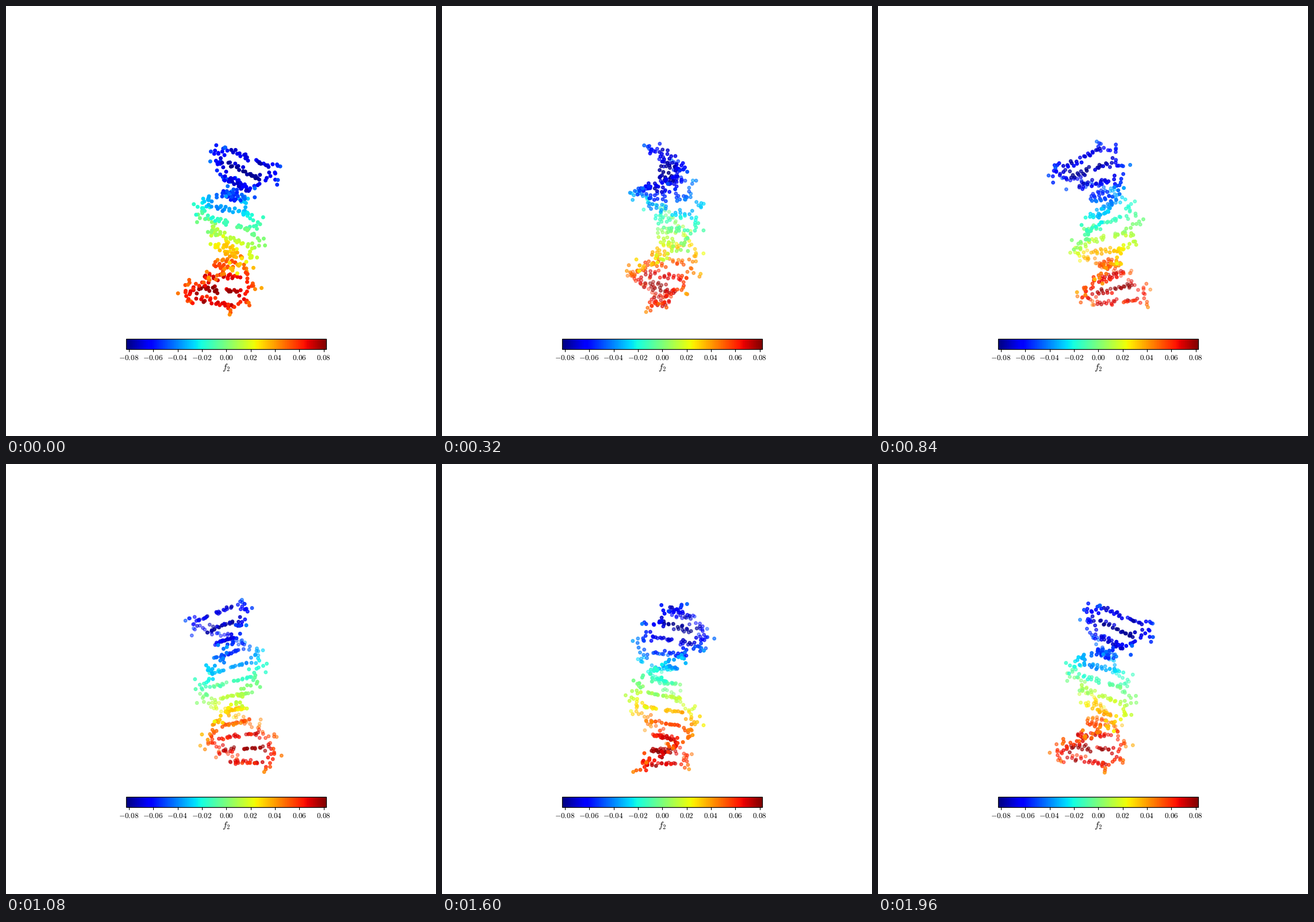
Animation, 748 px wide and 748 px high, one loop 2 s. Source, as a matplotlib script:

```python
import numpy as np
import matplotlib.pyplot as plt
from matplotlib.animation import FuncAnimation
from matplotlib.patches import Rectangle

SIZE, DPI = 748, 100
FRAMES, INTERVAL = 50, 40
ELEV = np.radians(10)
CAMERA = 3200
VMAX = 0.0822

plt.rcParams["mathtext.fontset"] = "cm"

SEQUENCE = "CGCGAATTCGCG"
PAIR = dict(zip("ACGT", "TGCA"))
TURN = 36


def arc(cx, cy, radius, start, step, count):
    """Points on a circle, angles in degrees."""
    t = np.radians(start + step * np.arange(count))
    return np.column_stack([cx + radius * np.cos(t), cy + radius * np.sin(t)])


def base_atoms(base):
    """Flat base: a hexagon, a pentagon for purines, and side atoms."""
    if base in "AG":
        centre, start = (-0.97, 1.93), 41
        side = [-20] + [219] * (base == "G")
        rings = [arc(-0.32, 3.90, 1.14, 0, 72, 3)]
    else:
        centre, start = (-0.21, 3.71), 22
        side = [202, 322] + [22] * (base == "T")
        rings = []
    rings.append(arc(*centre, 1.37, start, 60, 6))
    rings += [arc(*centre, 2.67, angle, 0, 1) for angle in side]
    flat = np.vstack(rings)
    return np.column_stack([flat, 0.08 * flat[:, 0]])


def spine_atoms(first):
    """Backbone chain, sugar ring and, past the first unit, a phosphate."""
    k = np.arange(1 if first else 0, 6)
    chain = [7.7 + 0.16 * (k - 2.8) ** 2, 88 + 7 * k, 0.1 * k ** 2 - 1.9]
    u = np.radians([90, 160, 230])
    sugar = [7.1 + 1.2 * np.cos(u), 113 + 0 * u, 1.1 * np.sin(u) - 0.45]
    parts = [chain, sugar]
    if not first:
        side = np.array([-1, 1])
        parts.append([9.85 + 0.55 * side, 87 + 5 * side, -1.35 - 0.65 * side])
    r, phi, z = np.hstack(parts)
    phi = np.radians(phi)
    return np.column_stack([r * np.cos(phi), r * np.sin(phi), z])


def nucleotide(base, first, rng):
    spine, flat = spine_atoms(first), base_atoms(base)
    return np.vstack([spine + rng.normal(0, 0.3, spine.shape),
                      flat + rng.normal(0, 0.07, flat.shape)])


def pair_frame(i):
    """Centre and local axes of base pair i on the bent helix axis."""
    s = i / (len(SEQUENCE) - 1)
    centre = np.array([1.2 - 2.4 * s,
                       4.8 - 13.7 * s + 5.4 * s * s,
                       18.3 - 35.9 * s])
    ez = np.array([-2.4, 1.1 * (10.8 * s - 13.7), -35.9])
    ez /= np.linalg.norm(ez)
    ex = np.cross([0, 1, 0], ez)
    ex /= np.linalg.norm(ex)
    ey = np.cross(ez, ex)
    c, w = np.cos(np.radians(TURN * i)), np.sin(np.radians(TURN * i))
    return centre, np.array([c * ex + w * ey, c * ey - w * ex, ez])


def build_helix():
    rng = np.random.default_rng(4)
    parts = []
    last = len(SEQUENCE) - 1
    for i, base in enumerate(SEQUENCE):
        centre, axes = pair_frame(i)
        one = nucleotide(base, i == 0, rng)
        two = nucleotide(PAIR[base], i == last, rng) * [1, -1, -1]
        parts += [centre + one @ axes, centre + two @ axes]
    return np.vstack(parts)


def fiedler(points, radius=5.5):
    """Second eigenvector of the normalised neighbour-graph Laplacian."""
    dist = np.linalg.norm(points[:, None] - points[None], axis=2)
    near = (dist < radius).astype(float)
    np.fill_diagonal(near, 0)
    scale = 1 / np.sqrt(near.sum(axis=1))
    laplacian = np.eye(len(points)) - scale[:, None] * near * scale
    vec = np.linalg.eigh(laplacian)[1][:, 1]
    if vec @ points[:, 2] > 0:
        vec = -vec
    return vec * VMAX / np.abs(vec).max()


def project(points, azim):
    x, y, z = points.T
    right = y * np.cos(azim) - x * np.sin(azim)
    front = x * np.cos(azim) + y * np.sin(azim)
    depth = front * np.cos(ELEV) + z * np.sin(ELEV)
    up = z * np.cos(ELEV) - front * np.sin(ELEV)
    zoom = CAMERA / (CAMERA - depth)
    return np.column_stack([391 + right * zoom, 393 - up * zoom]), depth


atoms = build_helix()
jet = plt.get_cmap("jet")
colours = jet((fiedler(atoms) + VMAX) / (2 * VMAX))
atoms = atoms * [6.65, 6.65, 7.17]

fig = plt.figure(figsize=(SIZE / DPI, SIZE / DPI), dpi=DPI, facecolor="white")
ax = fig.add_axes([0, 0, 1, 1])
ax.set_axis_off()

# Colour bar: 60 % of the default axes width, 20 times as wide as high
WIDTH = 0.6 * 0.775 * SIZE
HEIGHT = WIDTH / 20
LEFT, TOP = 0.28 * SIZE, 579.33
RIGHT, BOTTOM = LEFT + WIDTH, TOP + HEIGHT
MIDDLE = LEFT + WIDTH / 2
ax.imshow(np.linspace(0, 1, 256)[None], cmap=jet, aspect="auto",
          interpolation="nearest", extent=(LEFT, RIGHT, BOTTOM, TOP))
ax.add_patch(Rectangle((LEFT, TOP), WIDTH, HEIGHT, fill=False,
                       edgecolor="black", linewidth=0.9))
for k in range(-4, 5):
    value = 0.02 * k
    x = MIDDLE + value / VMAX * WIDTH / 2
    ax.plot([x, x], [BOTTOM, BOTTOM + 4], color="black", linewidth=0.8)
    ax.text(x - (k < 0), 616, f"${value:.2f}$", fontsize=9.5,
            ha="center", va="baseline")
ax.text(MIDDLE, 633.5, "$f_2$", fontsize=11, ha="center", va="baseline")
ax.set_xlim(0, SIZE)
ax.set_ylim(SIZE, 0)

dots = ax.scatter(atoms[:, 0], atoms[:, 1], s=14, linewidths=1.25, zorder=3)


def update(i):
    pos, depth = project(atoms, 2 * np.pi * i / FRAMES)
    rgba = colours.copy()
    if i:  # the opening pose is drawn without depth shading
        rgba[:, 3] = 0.3 + 0.7 * (depth - depth.min()) / np.ptp(depth)
    order = np.argsort(depth)
    dots.set_offsets(pos[order])
    dots.set_facecolors(rgba[order])
    dots.set_edgecolors(rgba[order])
    return (dots,)


anim = FuncAnimation(fig, update, frames=FRAMES, interval=INTERVAL,
                     repeat=True, repeat_delay=0)
plt.show()
```
